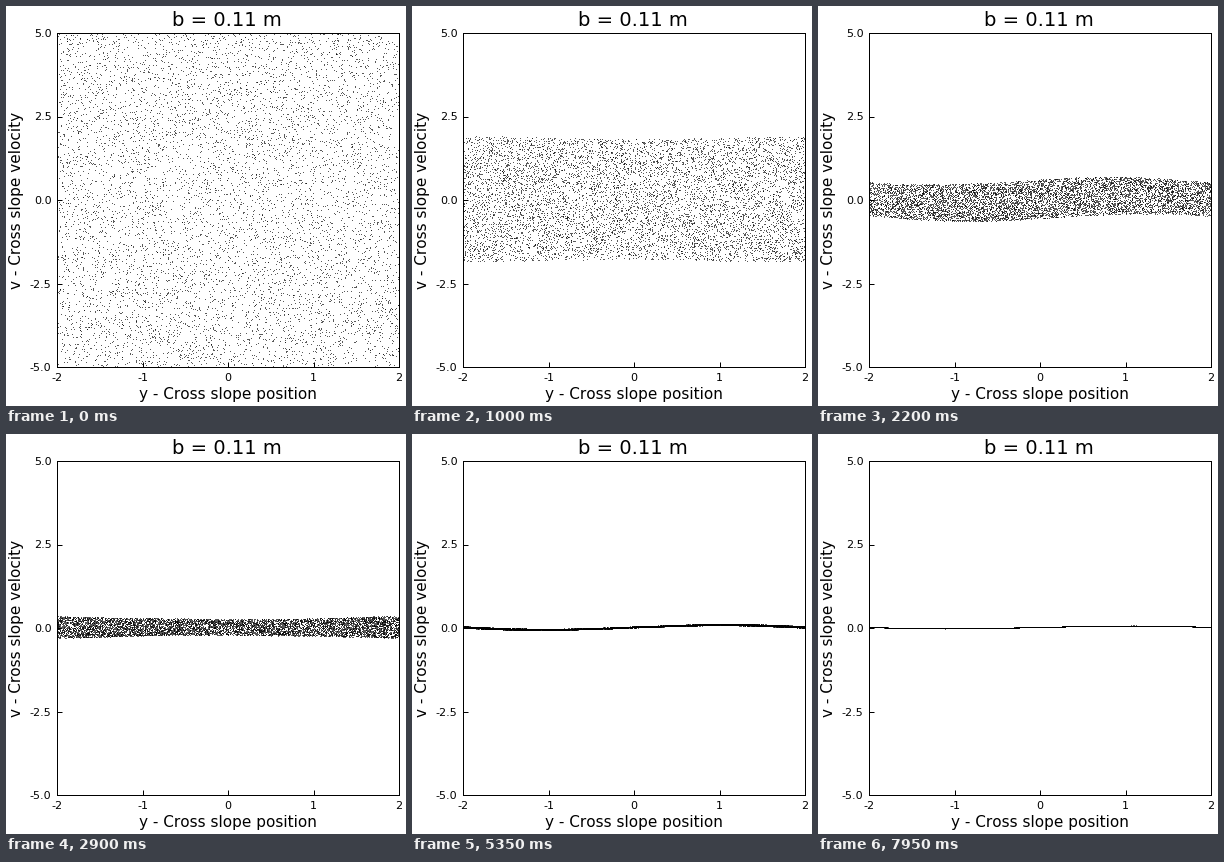
Animation of 400x400 px, one loop 8 s. Source, as a matplotlib script:

```python
import numpy as np
import matplotlib.pyplot as plt
from matplotlib.animation import FuncAnimation

SIZE, DPI = 400, 100
FRAMES, INTERVAL = 160, 50
LEFT, RIGHT, TOP, BOTTOM = 51, 393, 27, 361

# Sled sliding at constant speed over a field of moguls
COUNT = 7500
DRAG, SPEED = 0.5, 3.5
P, Q = 2 * np.pi / 10, 2 * np.pi / 4
PUSH = 0.11 * Q / (1 + 0.25 ** 2)
DT, SUBSTEPS = 0.1, 2


def slope(t, s):
    y, v = s
    force = -PUSH * np.cos(P * SPEED * t) * np.sin(Q * y)
    return np.array([v, force - DRAG * v])


def rk4(t, s, h):
    k1 = slope(t, s)
    k2 = slope(t + h / 2, s + h / 2 * k1)
    k3 = slope(t + h / 2, s + h / 2 * k2)
    k4 = slope(t + h, s + h * k3)
    return s + h / 6 * (k1 + 2 * k2 + 2 * k3 + k4)


def simulate():
    rng = np.random.default_rng(11)
    s = np.array([rng.uniform(-2, 2, COUNT), rng.uniform(-5, 5, COUNT)])
    h = DT / SUBSTEPS
    states = []
    for n in range(FRAMES):
        states.append(((s[0] + 2) % 4 - 2, s[1]))
        for k in range(SUBSTEPS):
            s = rk4(n * DT + k * h, s, h)
    return states


plt.rcParams["font.family"] = "DejaVu Sans"
plt.rcParams["text.kerning_factor"] = 6
plt.rcParams["axes.unicode_minus"] = False
fig = plt.figure(figsize=(SIZE / DPI, SIZE / DPI), dpi=DPI, facecolor="white")
ax = fig.add_axes([LEFT / SIZE, 1 - BOTTOM / SIZE,
                   (RIGHT - LEFT) / SIZE, (BOTTOM - TOP) / SIZE])
ax.set(xlim=(-2, 2), ylim=(-5, 5))
px = 72 / DPI
ax.set_xticks([-2, -1, 0, 1, 2])
ax.set_yticks([-5, -2.5, 0, 2.5, 5])
ax.tick_params(direction="in", length=5 * px, width=px, pad=4, labelsize=8)
for spine in ax.spines.values():
    spine.set_linewidth(px)


def label(x, y, text, size, **kw):
    fig.text(x / SIZE, 1 - y / SIZE, text, fontsize=size,
             ha="center", va="baseline", **kw)


label(221, 20, "b = 0.11 m", 14)
label(222, 393, "y - Cross slope position", 11)
label(15, 194, "v - Cross slope velocity", 11,
      rotation=90, rotation_mode="anchor")

states = simulate()
dots, = ax.plot([], [], ",", color="black", alpha=0.65)


def draw(n):
    dots.set_data(*states[n])
    return dots,


anim = FuncAnimation(fig, draw, frames=FRAMES, interval=INTERVAL,
                     repeat=True, repeat_delay=0)
plt.show()
```
